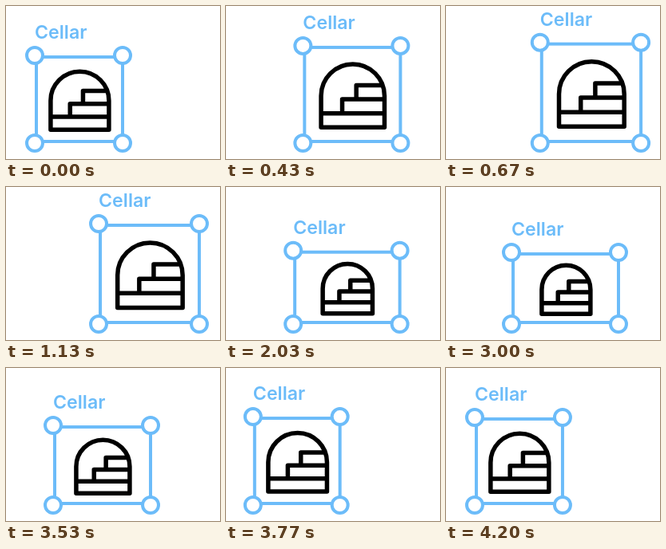
Animation of 268x192 px, one loop 4.76 s. Source, as an HTML page:

```html
<!DOCTYPE html>
<html lang="en">
<head>
<meta charset="utf-8">
<title>Cellar</title>
<style>
  html, body { margin: 0; width: 100%; height: 100%; overflow: hidden; background: #fff; }
  svg { display: block; width: 100vw; height: 100vh; }
  #label { font: 600 23.2px Inter, "Open Sans", sans-serif; fill: #6cbcf9; }
  #frame, #handles circle { stroke: #6cbcf9; stroke-width: 4; }
  #frame { fill: none; }
  #handles circle { fill: #fff; }
  #icon { fill: none; stroke: #000; stroke-linejoin: round; }
</style>
</head>
<body>
<svg viewBox="0 0 268 192">
  <text id="label">Cellar</text>
  <rect id="frame"/>
  <path id="icon" d="M-9 9V0A9 9 0 0 1 9 0V9ZM-9 5H9M-3 5V1H9M1 1V-3H8.49"/>
  <g id="handles">
    <circle r="10"/><circle r="10"/><circle r="10"/><circle r="10"/>
  </g>
</svg>
<script>
  const LOOP = 4760;
  const BOTTOM = 172;
  const ICON_STROKE = 5.5;

  // Resting boxes; left and right are handle centres, icon is its size.
  const small = { left: 36, top: 62, right: 146, icon: 73 };
  const large = { left: 116, top: 46, right: 242, icon: 81.5 };
  const wide = { left: 82, top: 82, right: 216, icon: 61 };

  const moves = [
    { at: 315, from: small, to: large },
    { at: 1882, from: large, to: wide },
    { at: 3449, from: wide, to: small }
  ];

  const $ = id => document.getElementById(id);
  const label = $("label"), frame = $("frame"), icon = $("icon");
  const handles = [...$("handles").children];

  function set(el, attrs) {
    for (const name in attrs) el.setAttribute(name, attrs[name]);
  }

  // Underdamped spring from 0 to 1.
  function spring(ms) {
    const decay = 0.731;
    const a = ms / 1000 * 13.3;
    return 1 - Math.exp(-decay * a) * (Math.cos(a) + decay * Math.sin(a));
  }

  function poseAt(t) {
    const move = moves.filter(m => m.at <= t).pop();
    if (!move) return small;
    const p = spring(t - move.at);
    const pose = {};
    for (const key in small) {
      pose[key] = move.from[key] + (move.to[key] - move.from[key]) * p;
    }
    return pose;
  }

  function draw(t) {
    const { left, top, right, icon: size } = poseAt(t);
    const scale = size / 18;
    const cx = (left + right + 2) / 2 + 0.4;
    const cy = (top + BOTTOM) / 2 + 1.7;

    set(label, { x: left, y: top - 21 });
    set(frame, { x: left + 2, y: top + 2, width: right - left - 2, height: BOTTOM - top - 4 });
    set(icon, {
      transform: `translate(${cx} ${cy}) scale(${scale})`,
      "stroke-width": ICON_STROKE / scale
    });
    handles.forEach((h, i) => set(h, { cx: i % 2 ? right : left, cy: i < 2 ? top : BOTTOM }));
  }

  const start = performance.now();
  function tick() {
    draw((performance.now() - start) % LOOP);
    requestAnimationFrame(tick);
  }
  tick();
</script>
</body>
</html>
```
